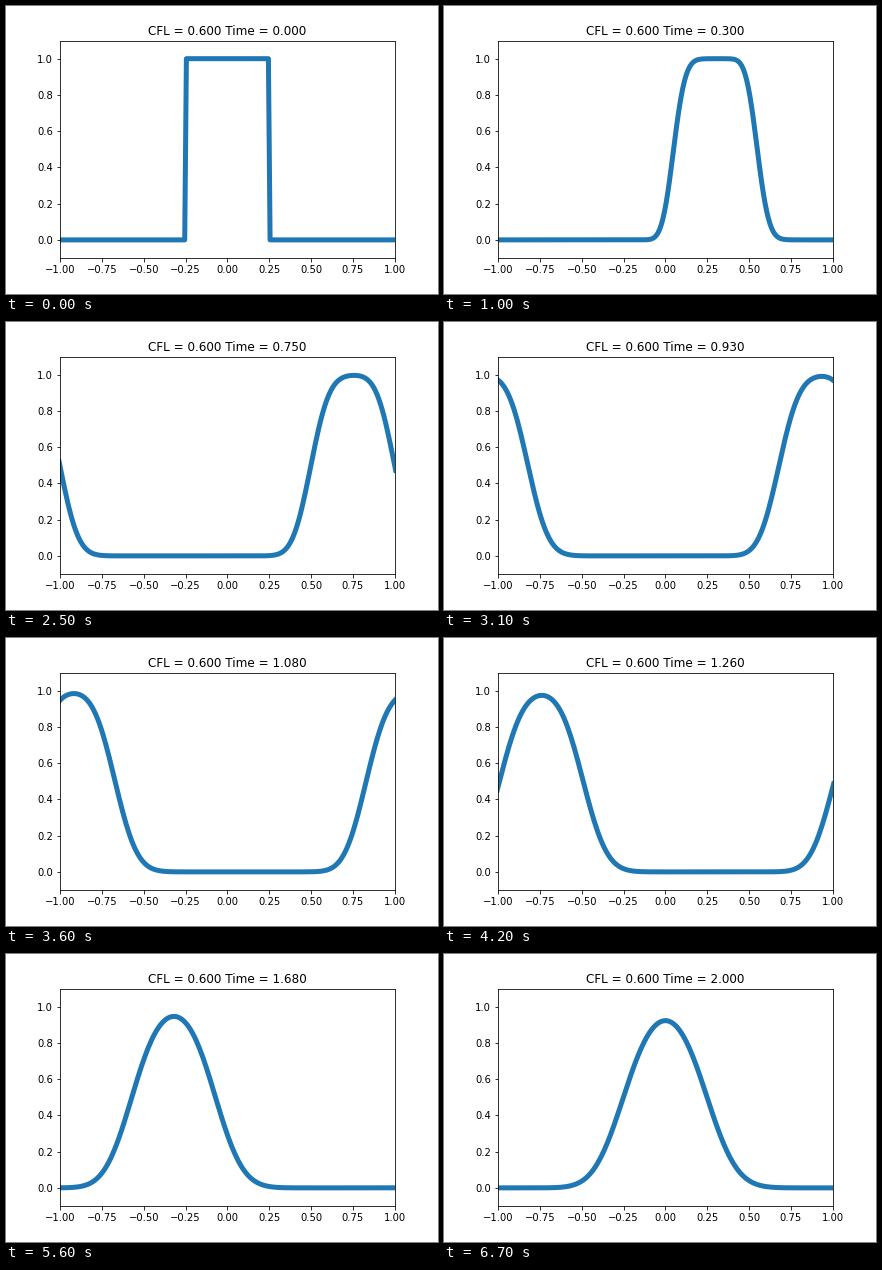
Animation of 432 by 288 pixels, one loop 6.8 s. Source, as a matplotlib script:

```python
import numpy as np
import matplotlib.pyplot as plt
from matplotlib.animation import FuncAnimation

CELLS = 200
CFL = 0.6
T_END = 2.0
FRAMES = 68
STEPS_PER_FRAME = 5

DX = 2.0 / CELLS
DT = CFL * DX

# cell centres with one ghost cell on each side
x = -1 + DX * (np.arange(CELLS + 2) - 0.5)


def fill_ghosts(u):
    u[0], u[-1] = u[-2], u[1]


def upwind(u):
    fill_ghosts(u)
    rate = np.zeros_like(u)
    rate[1:-1] = -(u[1:-1] - u[:-2]) / DX
    return rate


def step(u, dt):
    """Second-order Runge-Kutta step; ghost cells keep their last fill."""
    k1 = upwind(u)
    k2 = upwind(u + dt * k1)
    return u + 0.5 * dt * (k1 + k2)


def solve():
    u = np.where(np.abs(x) < 0.25, 1.0, 0.0)
    t = 0.0
    states = [(t, u)]
    while len(states) < FRAMES:
        for _ in range(STEPS_PER_FRAME):
            dt = min(DT, T_END - t)
            if dt < 1e-9:
                break
            u = step(u, dt)
            t += dt
        states.append((t, u))
    return states


states = solve()

plt.rcParams["font.family"] = "DejaVu Sans"
fig, ax = plt.subplots(figsize=(6, 4), dpi=72, facecolor="white")
fig.subplots_adjust(left=0.125, right=0.9, bottom=0.125, top=0.88)
ax.set_xlim(-1, 1)
ax.set_ylim(-0.1, 1.1)
line, = ax.plot(x, states[0][1], color="#1f77b4", lw=5)
title = ax.set_title("")


def draw(i):
    t, u = states[i]
    line.set_ydata(u)
    title.set_text(f"CFL = {CFL:.3f} Time = {t:.3f}")
    return line, title


anim = FuncAnimation(fig, draw, frames=FRAMES, interval=100,
                     repeat=True, repeat_delay=0, blit=False)
plt.show()
```
